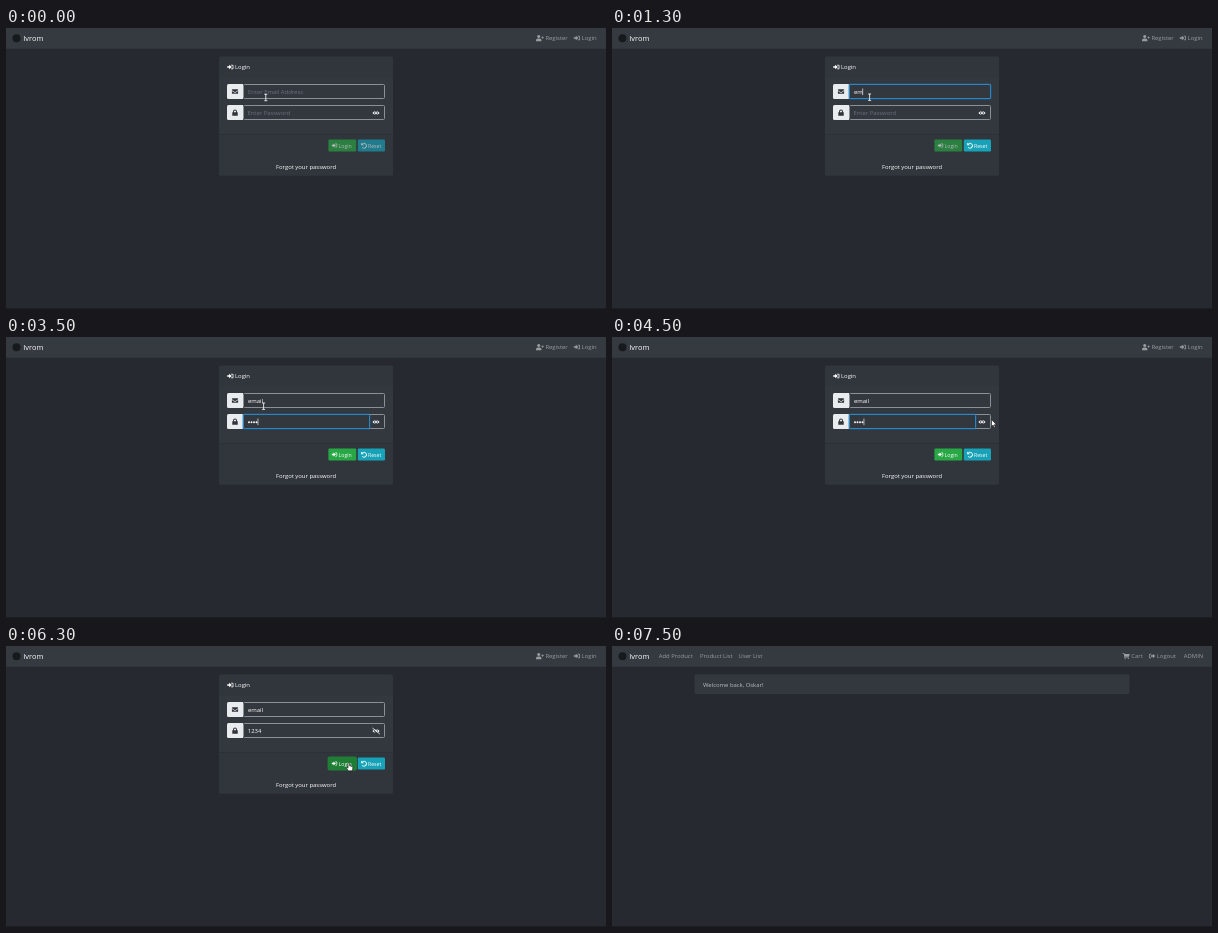
These frames come from a looping animation (600 by 281 pixels, 8.3 s). An HTML page:

```html
<!DOCTYPE html>
<html lang="en">
<head>
<meta charset="utf-8">
<title>Login form</title>
<style>
html, body { margin: 0; width: 100%; height: 100%; overflow: hidden; background: #262a30; }
svg { display: block; width: 600px; height: 281px; }
text { font-family: "Open Sans", "Noto Sans", sans-serif; font-size: 5.92px; fill: #fff; white-space: pre; }
.brand { font-size: 7.4px; }
.nav text, .nav path { fill: #9a9da0; }
.btn text { font-size: 5.2px; }
.hint { fill: #69717a; }
.box { fill: none; stroke: #8b9096; }
.ring { fill: none; stroke: #2f86bd; }
.halo { fill: none; stroke: #0b68b8; stroke-opacity: .35; }
.caret { fill: #e8eaec; }
.cursor { fill: #fff; stroke: #000; stroke-width: .5; stroke-linejoin: round; }
</style>
</head>
<body>
<svg id="stage" viewBox="0 0 600 281" xmlns="http://www.w3.org/2000/svg"></svg>
<script>
const LOOP = 8300;
const EM = 0.39; // icon grid of 16 units to one text line

const EYE = 'M0 8Q9-2.6 18 8 9 18.6 0 8zM9 3.6a4.4 4.4 0 1 0 .01 0zM9 5.4a2.6 2.6 0 1 0 .01 0z';
const ICONS = {
  signIn: 'M10 2h3a3 3 0 0 1 3 3v6a3 3 0 0 1-3 3h-3v-2h3a1 1 0 0 0 1-1V5a1 1 0 0 0-1-1h-3zM0 6h5V2l7 6-7 6v-4H0z',
  signOut: 'M6 2H3a3 3 0 0 0-3 3v6a3 3 0 0 0 3 3h3v-2H3a1 1 0 0 1-1-1V5a1 1 0 0 1 1-1h3zM5 6h5V2l6 6-6 6v-4H5z',
  mail: 'M0 3.5Q0 2 1.5 2h13Q16 2 16 3.5v1L8 10 0 4.5zM0 6.5L8 12l8-5.5v6Q16 14 14.5 14h-13Q0 14 0 12.5z',
  lock: 'M1 7h2V5a5 5 0 0 1 10 0v2h2v9H1zM5.5 7h5V5a2.5 2.5 0 0 0-5 0z',
  undo: 'M0 .5h2.2v3A8 8 0 1 1 2.3 13.6L3.9 12A5.7 5.7 0 1 0 3.9 4.9H7v2.3H0z',
  addUser: 'M7 0a4 4 0 1 0 .01 0zM0 16v-2a5 5 0 0 1 5-5h4a5 5 0 0 1 5 5v2zM16 4h2v2h2v2h-2v2h-2V8h-2V6h2z',
  cart: 'M0 .5h4l.5 2H18l-1.8 7.5H6l.3 1.5h9.5v1.6H4.8L2.6 2.4H0zM6.3 13a1.5 1.5 0 1 0 .01 0zM14.5 13a1.5 1.5 0 1 0 .01 0z'
};

const rect = (x, y, w, h, attrs) => `<rect x="${x}" y="${y}" width="${w}" height="${h}" ${attrs}/>`;
const text = (x, y, str, attrs = '') => `<text x="${x}" y="${y}" ${attrs}>${str}</text>`;
const icon = (name, x, y, fill = '#fff', k = EM) =>
  `<path d="${ICONS[name]}" transform="translate(${x} ${y}) scale(${k})" fill="${fill}" fill-rule="evenodd"/>`;

const focusRing = (id, y, w) => `<g id="${id}">
  ${rect(236.5, y - 1, w + 2, 16, 'rx="2" class="halo"')}
  ${rect(237.5, y, w, 14, 'rx="1" class="ring"')}</g>`;

const field = (y, name) =>
  `<path d="M237 ${y - .5}h-14.5q-1.5 0-1.5 1.5v12q0 1.5 1.5 1.5h14.5z" fill="#e9ecef"/>
  ${icon(name, 225.9, y + 3.9, '#30353b')}
  ${rect(237.5, y, 141, 14, 'rx="1" class="box"')}`;

const button = (id, x, w, fill, name, label) => `<g id="${id}" class="btn">
  ${rect(x, 111.5, w, 12, `rx="1.2" fill="${fill}"`)}
  ${icon(name, x + 3.4, 114.8, '#fff', .34)}
  ${text(x + 10.2, 119.5, label)}</g>`;

const loginPage = `<g id="login">
  <g class="nav">
    ${icon('addUser', 530, 6.9)}${text(539.4, 12.3, 'Register')}
    ${icon('signIn', 567.8, 6.9)}${text(575.6, 12.3, 'Login')}
  </g>
  ${rect(213, 28.5, 174, 119.3, 'rx="1.5" fill="#31363c"')}
  ${rect(213, 49.5, 174, 56.5, 'fill="#33383f"')}
  ${rect(213, 106, 174, .7, 'fill="#2a2f35"')}
  ${icon('signIn', 221.2, 35.9)}${text(229, 41.2, 'Login')}
  ${field(56.5, 'mail')}
  ${text(242, 66.3, 'Enter Email Address', 'id="mailHint" class="hint"')}
  ${text(242, 66.3, '', 'id="mailText"')}
  ${focusRing('mailRing', 56.5, 141)}
  ${field(77.5, 'lock')}
  ${text(241.4, 87.3, 'Enter Password', 'id="passHint" class="hint"')}
  ${text(241.8, 87.3, '1234', 'id="passText"')}
  <g id="dots" fill="#fff">${[0, 1, 2, 3].map(i => `<circle cx="${243 + 2.5 * i}" cy="85.2" r=".95"/>`).join('')}</g>
  ${focusRing('passRing', 77.5, 126)}
  ${rect(0, 0, .7, 6.6, 'id="caret" class="caret"')}
  <g transform="translate(366.4 81.8) scale(.4)">
    <path d="${EYE}" fill="#fff" fill-rule="evenodd"/>
    <g id="slash" fill="none">
      <path d="M0 2.4L17 17" stroke="#33383f" stroke-width="2.2"/>
      <path d="M0 .5L18.5 15.5" stroke="#fff" stroke-width="2"/>
    </g>
  </g>
  ${rect(321.6, 110.6, 29.4, 13.8, 'id="btnRing" rx="2" fill="#247a3b"')}
  ${button('loginBtn', 322.4, 27.8, '#28a745', 'signIn', 'Login')}
  ${button('resetBtn', 351.8, 27.2, '#17a2b8', 'undo', 'Reset')}
  ${text(300, 140.6, 'Forgot your password', 'text-anchor="middle"')}
</g>`;

const homePage = `<g id="home">
  <g class="nav">
    ${text(46.7, 12.3, 'Add Product')}${text(88, 12.3, 'Product List')}${text(126.6, 12.3, 'User List')}
    ${icon('cart', 510.7, 6.9)}${text(519.3, 12.3, 'Cart')}
    ${icon('signOut', 537, 6.9)}${text(544.8, 12.3, 'Logout')}
    ${text(591.3, 12.3, 'ADMIN', 'text-anchor="end"')}
  </g>
  ${rect(82.5, 28.5, 435, 19.5, 'rx="1.5" fill="#33383f"')}
  ${text(91, 41.2, 'Welcome back, Oskar!', 'style="fill:#b8bbbf"')}
</g>`;

const cursors = `<g class="cursor">
  <path id="beam" d="M-1.5-3.2H1.5M0-3.2V3.2M-1.5 3.2H1.5" style="stroke:#fff;stroke-width:.8"/>
  <path id="arrow" d="M0 0v7l1.6-1.4 1.1 2.4 1.1-.5-1.1-2.3h2.2z"/>
  <path id="hand" d="M-.7.5Q0-.4.7.5V3l2.6.7q.9.3.8 1.2L3.5 8H-.4L-2.2 5.2q-.1-1 .7-.7l.8.6z"/>
</g>`;

document.getElementById('stage').innerHTML =
  rect(0, 0, 600, 281, 'fill="#262a30"') +
  rect(0, 0, 600, 20.8, 'fill="#343a40"') +
  rect(0, 280, 600, 1, 'fill="#1b1e22"') +
  '<circle cx="10.5" cy="10.3" r="4" fill="#171a1d"/>' +
  text(17.3, 12.8, 'Ivrom', 'class="brand"') +
  loginPage + homePage + cursors;

const el = {};
document.querySelectorAll('#stage [id]').forEach(node => el[node.id] = node);

// Each step changes only what it names.
const STEPS = [
  [0, { mail: '', pass: 0, mailFocus: 0, passFocus: 0, caret: false, reveal: false, reset: .65, login: .65,
        green: '#28a745', pressed: false, home: false, cursor: ['beam', 259.8, 69.5] }],
  [300, { mailFocus: .6, caret: true, cursor: ['beam', 257.6, 69.2] }],
  [500, { mailFocus: 1 }],
  [800, { caret: false }],
  [1000, { mail: 'e', caret: true, reset: .8 }],
  [1300, { mail: 'em', reset: 1 }],
  [1500, { mail: 'ema' }],
  [1800, { mail: 'emai' }],
  [2000, { mail: 'email' }],
  [2300, { mailFocus: 0, passFocus: .65 }],
  [2500, { passFocus: 1 }],
  [2800, { pass: 1, login: .8 }],
  [3000, { pass: 2, login: 1 }],
  [3300, { pass: 3 }],
  [3500, { pass: 4 }],
  [4000, { caret: false, cursor: ['beam', 316, 85.2] }],
  [4300, { cursor: ['beam', 346, 75.5] }],
  [4500, { caret: true, cursor: ['arrow', 379.5, 82.5] }],
  [4800, { passFocus: 0, caret: false, cursor: ['hand', 375, 83.8] }],
  [5000, { reveal: true }],
  [5500, { cursor: ['arrow', 356, 100.3] }],
  [5800, { green: '#249640', cursor: ['hand', 342.8, 116.8] }],
  [6000, { green: '#218838' }],
  [6300, { green: '#1e7e34', pressed: true }],
  [6500, { home: true, cursor: ['arrow', 338.5, 116.8] }],
  [7300, { cursor: ['arrow', 335.6, 140.3] }],
  [7500, { cursor: null }]
];

const stateAt = t => Object.assign({}, ...STEPS.filter(s => s[0] <= t).map(s => s[1]));
const show = (node, on) => node.style.display = on ? '' : 'none';

function draw(t) {
  const s = stateAt(t);
  show(el.login, !s.home);
  show(el.home, s.home);

  el.mailText.textContent = s.mail;
  show(el.mailHint, !s.mail);
  show(el.passHint, !s.pass);
  show(el.passText, s.reveal);
  show(el.dots, !s.reveal);
  [...el.dots.children].forEach((dot, i) => show(dot, i < s.pass));
  show(el.slash, s.reveal);
  el.mailRing.style.opacity = s.mailFocus;
  el.passRing.style.opacity = s.passFocus;

  show(el.caret, s.caret);
  const inPass = s.passFocus > 0;
  const mailEnd = s.mail && !inPass && !s.home ? el.mailText.getComputedTextLength() : 0;
  el.caret.setAttribute('x', inPass ? 241.4 + 2.55 * s.pass : 241.6 + mailEnd);
  el.caret.setAttribute('y', inPass ? 81.5 : 60.5);

  el.resetBtn.style.opacity = s.reset;
  el.loginBtn.style.opacity = s.login;
  el.loginBtn.querySelector('rect').setAttribute('fill', s.green);
  show(el.btnRing, s.pressed);

  const [kind, x, y] = s.cursor || [];
  for (const id of ['beam', 'arrow', 'hand']) {
    show(el[id], id === kind);
    if (id === kind) el[id].setAttribute('transform', `translate(${x} ${y})`);
  }
}

const start = performance.now();
function tick() {
  draw((performance.now() - start) % LOOP);
  requestAnimationFrame(tick);
}
tick();
</script>
</body>
</html>
```
